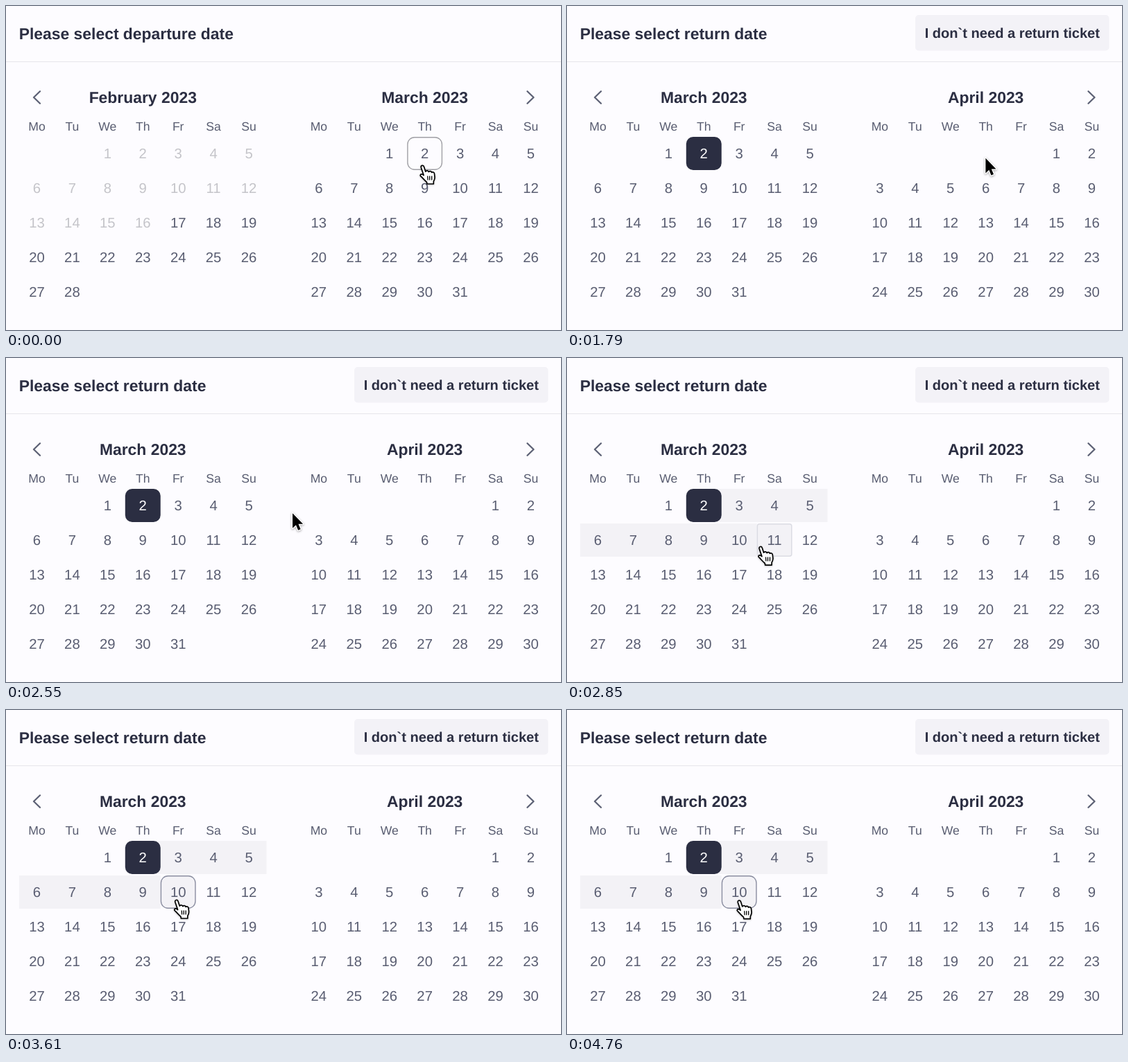
Recreate the animation shown at these times as an HTML page. Size 800x468 px, loop 4790 ms.

```html
<!DOCTYPE html>
<html lang="en">
<head>
<meta charset="utf-8">
<title>Date picker</title>
<style>
  html, body { margin: 0; width: 100%; height: 100%; overflow: hidden; background: #fdfcff; }
  svg { display: block; width: 800px; height: 468px; }
  text { font-family: "Liberation Sans", Arial, sans-serif; fill: #595d71; text-rendering: geometricPrecision; }
  .head { font-size: 22.9px; font-weight: 700; fill: #2b2e42; }
  .btn { font-size: 20.1px; font-weight: 700; fill: #2b2e42; }
  .mid { text-anchor: middle; }
  .week { font-size: 17.6px; }
  .day { font-size: 20.3px; }
  .off { fill: #c4c4c9; }
  .chev { fill: none; stroke: #5d6175; stroke-width: 2.3; stroke-linecap: round; stroke-linejoin: round; }
</style>
</head>
<body>
<svg id="stage" viewBox="0 0 800 468">
  <rect width="800" height="468" fill="#fdfcff"/>
  <rect y="80" width="800" height="1" fill="#e6e5ea"/>
  <path class="chev" d="M49 123.2L40 132L49 140.8M751.5 123.2L760.5 132L751.5 140.8"/>
  <g id="range" fill="#f3f2f6"><rect id="row1" y="189" height="48"/><rect id="row2" y="239" height="48"/></g>
  <rect id="picked" height="48" fill="#2b2e42"/>
  <rect id="ring" stroke-width="1.4"/>
  <g id="depart"></g>
  <g id="return"></g>
  <text id="pickedText" class="day mid"></text>
  <circle id="click" r="48.5" fill="none" stroke="#000" stroke-opacity=".8" stroke-width="3"/>
  <g id="cursor" stroke-linejoin="round">
    <g id="arrow" style="filter:drop-shadow(0 1.5px 1.5px rgba(0,0,0,.35))">
      <path d="M0 0V21.6L4.9 17L8.1 24.6L11.6 23.1L8.4 15.7H15.1Z" fill="#000" stroke="#fff" stroke-width="2.8" paint-order="stroke"/>
    </g>
    <g id="hand" style="filter:drop-shadow(0 1px 1px rgba(0,0,0,.25))">
      <path d="M-2.2 2.2C-2.8 -.8 .9 -1.8 2 1.2L4.3 8.2C5 6.4 8.2 6.4 8.8 8.6C10 7 12.6 7.4 13 9.4C14.4 8.2 16.6 9 17 11.2L17.6 16.4C17.6 19.5 16.4 21 15.8 22.5V26H6.4L6 23.5C3.5 21.5 1 18.5 -1.8 15.6C-4.6 13.8 -3 11.2 -.2 12.2L1.6 13.6Z" fill="#fff" stroke="#000" stroke-width="1.7"/>
      <path d="M7.2 14.5L7.6 20.5M10.2 14.5V20.5M13.2 14.5V20.5" fill="none" stroke="#000" stroke-width="1.3"/>
    </g>
  </g>
</svg>
<script>
const NS = "http://www.w3.org/2000/svg";
const LOOP = 4790, PITCH = 50.93, LEFT = 19, RIGHT = 425.4;
const SWAP = 910, HAND_OFF = 880, HAND_ON = 2770;
const $ = id => document.getElementById(id);

function set(el, attrs) {
  for (const k in attrs) el.setAttribute(k, attrs[k]);
  return el;
}
function add(parent, tag, attrs, text) {
  const el = set(document.createElementNS(NS, tag), attrs);
  if (text !== undefined) el.textContent = text;
  return parent.appendChild(el);
}
const show = (el, on) => { el.style.display = on ? "" : "none"; };
const clamp = v => Math.max(0, Math.min(1, v));
const ease = v => v * v * (3 - 2 * v);
const mix = (a, b, k) => a + (b - a) * k;

// Top left corner of a day's cell
function cell(left, offset, day) {
  const i = offset + day - 1;
  return { x: left + (i % 7) * PITCH, y: 189 + Math.floor(i / 7) * 50 };
}

function month(parent, left, name, offset, days, disabled, skip) {
  const mid = i => left + (i + 0.5) * PITCH;
  add(parent, "text", { class: "head mid", x: mid(3), y: 139.6 }, name);
  ["Mo", "Tu", "We", "Th", "Fr", "Sa", "Su"].forEach((d, i) =>
    add(parent, "text", { class: "week mid", x: mid(i), y: 180 }, d));
  for (let d = 1; d <= days; d++) {
    if (d === skip) continue;
    const c = cell(left, offset, d);
    add(parent, "text", {
      class: "day mid" + (d <= disabled ? " off" : ""),
      x: c.x + PITCH / 2, y: c.y + 31
    }, d);
  }
}

const depart = $("depart"), back = $("return");
add(depart, "text", { class: "head", x: 18.7, y: 48.4 }, "Please select departure date");
month(depart, LEFT, "February 2023", 2, 28, 16);
month(depart, RIGHT, "March 2023", 2, 31, 0);

add(back, "text", { class: "head", x: 18.7, y: 48.4 }, "Please select return date");
add(back, "rect", { x: 502, y: 13, width: 279.5, height: 51.5, rx: 5, fill: "#f3f2f7" });
add(back, "text", { class: "btn mid", x: 641.8, y: 45.8 }, "I don`t need a return ticket");
month(back, LEFT, "March 2023", 2, 31, 0, 2);
month(back, RIGHT, "April 2023", 5, 30, 0);

const start = cell(LEFT, 2, 2);
set($("picked"), { x: start.x, y: start.y, width: PITCH });
set($("pickedText"), { x: start.x + PITCH / 2, y: start.y + 31 }).textContent = 2;

// Pointer tip: time, x, y, eased segment
const path = [
  [0, 600.5, 231], [180, 605.5, 219.8, 1], [1765, 605.5, 219.8], [2180, 417, 222.5, 1],
  [2530, 417, 222.5], [2700, 385, 236], [2820, 318, 261], [2850, 280, 273],
  [2910, 238, 275], [3060, 225, 275], [3610, 246, 275, 1], [3660, 246, 275],
  [3790, 247.6, 275.3], [3930, 247.6, 275.3], [4000, 248.5, 275.7], [LOOP, 248.5, 275.7]
];
function tip(t) {
  let i = 1;
  while (i < path.length - 1 && t > path[i][0]) i++;
  const a = path[i - 1], b = path[i];
  let k = clamp((t - a[0]) / (b[0] - a[0]));
  if (b[3]) k = ease(k);
  return [mix(a[1], b[1], k), mix(a[2], b[2], k)];
}

const hovers = [[HAND_ON, 12], [2820, 11], [2890, 10]];

function drawRing(c, k, color) {
  set($("ring"), {
    x: c.x + 0.7, y: c.y + 0.7, width: PITCH - 1.4, height: 46.6,
    rx: mix(1, 10, k), stroke: color, "stroke-opacity": mix(0.05, 1, k)
  });
}

function draw(t) {
  const swapped = t >= SWAP;
  show(depart, !swapped);
  show(back, swapped);

  const k = ease(clamp((t - SWAP + 30) / 220));
  const tone = (a, b) => Math.round(mix(a, b, k));
  show($("picked"), swapped);
  show($("pickedText"), swapped);
  set($("picked"), { "fill-opacity": k, rx: mix(3, 10, k) });
  $("pickedText").style.fill = `rgb(${tone(89, 255)},${tone(93, 255)},${tone(113, 255)})`;

  const hover = hovers.filter(h => t >= h[0]).pop();
  show($("range"), hover);
  show($("ring"), hover || !swapped);
  if (hover) {
    const c = cell(LEFT, 2, hover[1]);
    set($("row1"), { x: start.x + PITCH / 2, width: LEFT + 7 * PITCH - start.x - PITCH / 2 });
    set($("row2"), { x: LEFT, width: c.x - LEFT });
    drawRing(c, clamp((t - hover[0] + 10) / 180), "#8a8da0");
    set($("ring"), { fill: "#f3f2f6" });
  } else {
    drawRing(cell(RIGHT, 2, 2), 1, t < 850 ? "#a0a0a5" : "#85899b");
    set($("ring"), { fill: "none" });
  }

  const [x, y] = tip(t);
  const hand = t < HAND_OFF || t >= HAND_ON;
  set($("cursor"), { transform: `translate(${x} ${y})` });
  show($("hand"), hand);
  show($("arrow"), !hand);
  set($("click"), { cx: x, cy: y + 0.5 });
  show($("click"), (t >= 670 && t < 850) || (t >= 4640 && t < 4760));
}

const t0 = performance.now();
function tick() {
  draw((performance.now() - t0) % LOOP);
  requestAnimationFrame(tick);
}
draw(0);
requestAnimationFrame(tick);
</script>
</body>
</html>
```
